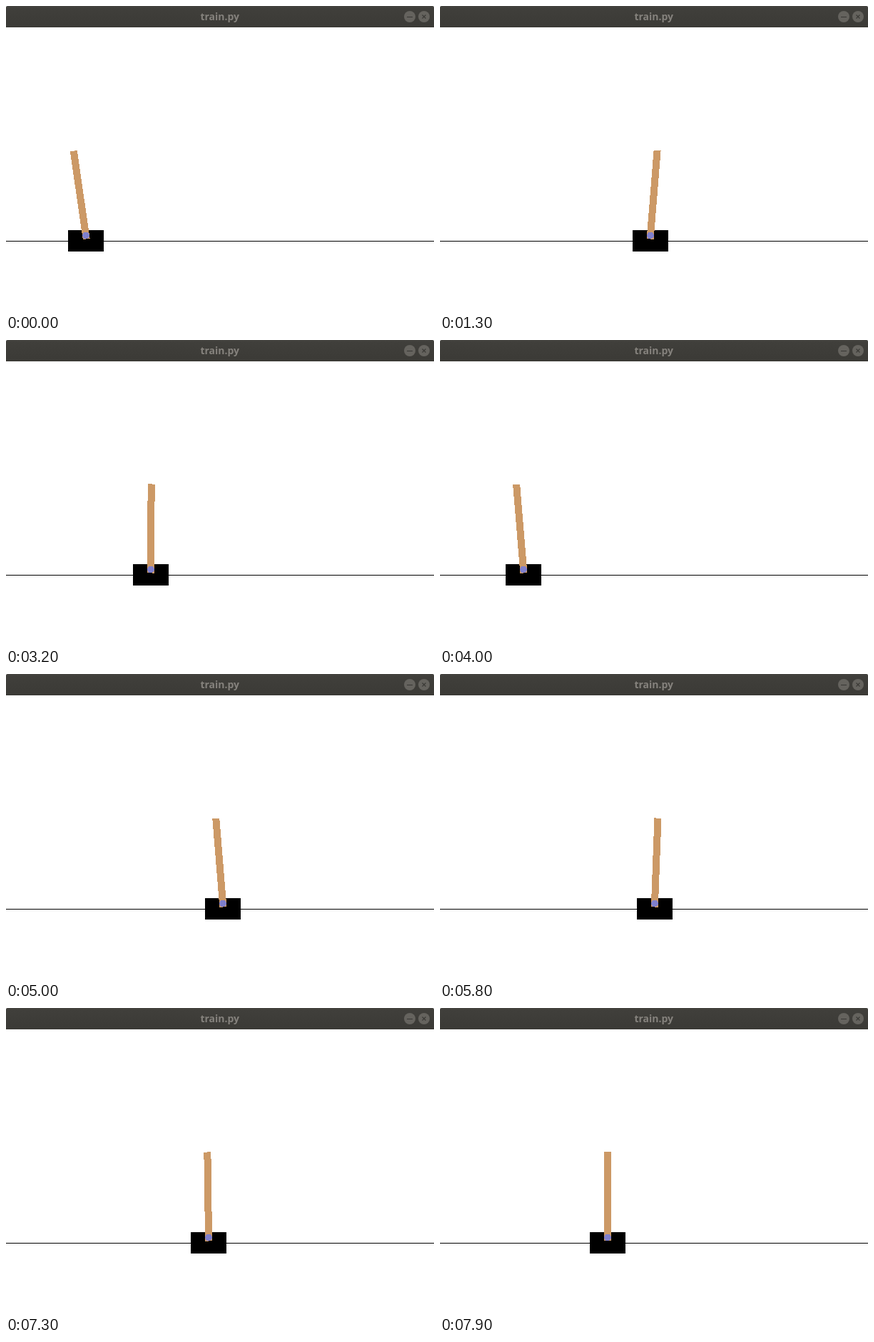
An HTML page for the animation above (8 s loop, 600 px wide and 430 px high).

```html
<!DOCTYPE html>
<html lang="en">
<head>
<meta charset="utf-8">
<title>train.py</title>
<style>
  html, body { margin: 0; width: 100%; height: 100%; overflow: hidden; background: #fff; }
  svg { display: block; width: 600px; height: 430px; }
  .title { font: 700 14px "Open Sans", "Noto Sans", sans-serif; fill: #85827d; text-anchor: middle; }
  .button circle { fill: #65635e; }
  .button path { fill: none; stroke: #3b3a36; stroke-width: 1.1; }
</style>
</head>
<body>
<svg viewBox="0 0 600 430">
  <defs>
    <linearGradient id="bar" x2="0" y2="1">
      <stop offset="0" stop-color="#454440"/>
      <stop offset=".1" stop-color="#403f3b"/>
      <stop offset="1" stop-color="#3b3a36"/>
    </linearGradient>
  </defs>

  <path d="M0 30V2Q0 0 2 0H598Q600 0 600 2V30Z" fill="url(#bar)"/>
  <text class="title" x="299.7" y="20">train.py</text>
  <g class="button" transform="translate(566 15)">
    <circle r="8"/><path d="M-4 .5H4"/>
  </g>
  <g class="button" transform="translate(586 15)">
    <circle r="8"/><path d="M-2.5-2.5L2.5 2.5M2.5-2.5L-2.5 2.5"/>
  </g>

  <g shape-rendering="crispEdges">
    <g id="cart">
      <rect x="-25" y="315" width="50" height="30"/>
      <g transform="translate(0 322.5)">
        <rect id="pole" x="-5" y="-120" width="10" height="125" fill="#cc9966"/>
        <circle r="4.8" fill="#7f7fcc"/>
      </g>
    </g>
    <rect y="330" width="600" height="1"/>
  </g>
</svg>
<script>
const STEP = 100, LOOP = 8000;
const SWING = 2.6;  // natural time of the pole, in steps
const GAIN = 0.8;   // degrees of lean per pixel
const REACH = 12;   // steps looked at on either side

// Cart centre at its turning points, per episode: [step, x]
const episodes = [
  { from: 0, path: [[-8, 210], [0, 112], [8, -80]] },
  { from: 5, path: [[5, 299], [11, 288], [13, 295], [16, 324], [20, 311], [32, 203], [38, 146], [44, 45]] },
  { from: 45, path: [[45, 295], [47, 289], [50, 304], [54, 291], [66, 331], [72, 291], [79, 235]] }
];

const slope = (a, b) => (b[1] - a[1]) / (b[0] - a[0]);

function tangent(path, i) {
  if (!i) return slope(path[0], path[1]);
  if (i === path.length - 1) return slope(path[i - 1], path[i]);
  const a = slope(path[i - 1], path[i]), b = slope(path[i], path[i + 1]);
  return a * b <= 0 ? 0 : 2 * a * b / (a + b);
}

// Smooth curve without overshoot, straight beyond both ends
function position(path, step) {
  const last = path.length - 1;
  for (const end of [0, last]) {
    const beyond = step - path[end][0];
    if (end ? beyond >= 0 : beyond <= 0) return path[end][1] + beyond * tangent(path, end);
  }
  const i = path.findIndex(p => p[0] > step) - 1;
  const a = path[i], b = path[i + 1], h = b[0] - a[0];
  const u = (step - a[0]) / h, v = 1 - u;
  return a[1] * (1 + 2 * u) * v * v + b[1] * (3 - 2 * u) * u * u
    + h * u * v * (tangent(path, i) * v - tangent(path, i + 1) * u);
}

// A balanced pole leans with the smoothed acceleration of its cart
function lean(path, step) {
  const x = position(path, step);
  let sum = 0, total = 0;
  for (let s = -REACH; s <= REACH; s++) {
    const weight = Math.exp(-Math.abs(s) / SWING);
    sum += weight * (position(path, step + s) - x);
    total += weight;
  }
  return GAIN * sum / total;
}

const cart = document.getElementById("cart");
const pole = document.getElementById("pole");
const start = performance.now();

function draw(now) {
  const step = Math.floor(Math.max(0, now - start) % LOOP / STEP);
  const { path } = episodes.findLast(e => step >= e.from);
  cart.setAttribute("transform", `translate(${Math.round(position(path, step))} 0)`);
  pole.setAttribute("transform", `rotate(${lean(path, step).toFixed(2)})`);
  requestAnimationFrame(draw);
}
draw(start);
</script>
</body>
</html>
```
